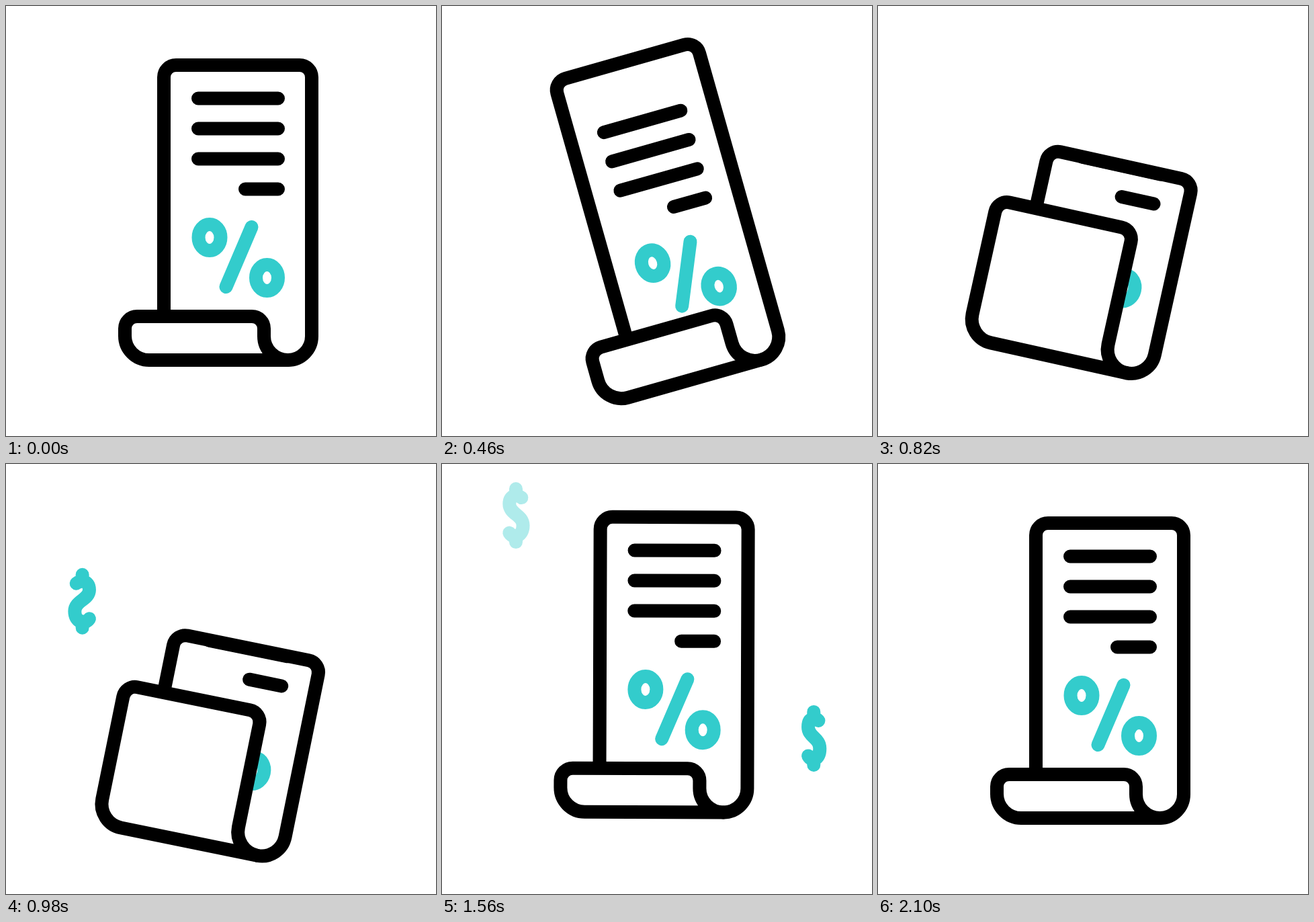
An HTML page with a canvas that plays this animation: 640 by 640 pixels, repeating every 2400 ms.

```html
<!DOCTYPE html>
<html lang="en">
<head>
<meta charset="utf-8">
<title>Receipt</title>
<style>
  html, body { margin: 0; height: 100%; overflow: hidden; background: #fff; }
  canvas { display: block; width: 640px; height: 640px; }
</style>
</head>
<body>
<canvas id="stage" width="640" height="640"></canvas>
<script>
const ctx = document.getElementById('stage').getContext('2d');
const LOOP = 2400, TEAL = '#33cccc', RAD = Math.PI / 180;

const dollar = new Path2D(
  'M0-39.5V-30M0 39.5V30M9.5-26.5C4-31-11-32-11-17S12-1 12 15C12 31-4 36-11 26');

const percent = new Path2D('M365.5 329 327.5 418');
for (const side of [-1, 1]) {
  const x = 345.75 + side * 42.75, y = 374.5 + side * 30;
  percent.moveTo(x + 16.5, y);
  percent.ellipse(x, y, 16.5, 19.5, 0, 0, 7);
}

const lines = new Path2D();
for (let i = 0; i < 4; i++) {
  lines.moveTo(i < 3 ? 286 : 356, 137.5 + 45 * i);
  lines.lineTo(405, 137.5 + 45 * i);
}

// Smooth step from 0 to 1 between two times.
function ramp(t, from, to) {
  const u = Math.min(Math.max((t - from) / (to - from), 0), 1);
  return u * u * (3 - 2 * u);
}

// Smooth rise to 1 and back to 0.
const bump = (t, from, peak, to) => ramp(t, from, peak) - ramp(t, peak, to);

// The paper stretches, rolls up and unrolls while it hops and rocks.
function pose(t) {
  const unroll = ramp(t, 1055, 1335);
  return {
    angle: -18 * bump(t, 0, 380, 887) + 14 * bump(t, 380, 887, 1360)
      - 10.3 * bump(t, 887, 1360, 1664) + 4 * bump(t, 1360, 1664, 2100),
    drop: 54 * bump(t, 0, 380, 640) - 24 * bump(t, 380, 640, 1105)
      + 53 * bump(t, 640, 1105, 1390) - 24 * bump(t, 1105, 1390, 1800)
      + 16 * bump(t, 1390, 1800, 2100),
    top: 88 - 72 * bump(t, 0, 395, 680) + 139 * (ramp(t, 395, 680) - unroll),
    fold: 462 - 145 * (ramp(t, 410, 640) - unroll)
  };
}

function stroke(path, color) {
  ctx.strokeStyle = color;
  ctx.stroke(path);
}

function outline(d) {
  const path = new Path2D(d);
  ctx.fill(path);
  stroke(path, '#000');
}

// A rising sign that spins about its upright axis; the pen keeps its width.
function drawDollar(x, y, age) {
  const alpha = Math.min(age, 768 - age, 100) / 100;
  if (alpha <= 0) return;
  const turn = -1.38 * Math.cos(age * 0.316 * RAD);
  const path = new Path2D();
  path.addPath(dollar, new DOMMatrix([turn, 0, 0, 1, x - 2 * turn, y - 0.22 * age]));
  ctx.globalAlpha = alpha;
  stroke(path, TEAL);
  ctx.globalAlpha = 1;
}

function drawReceipt(t) {
  const { angle, drop, top, fold } = pose(t);
  ctx.save();
  ctx.translate(316, 307.5 + drop);
  ctx.rotate(angle * RAD);
  ctx.translate(-316, -307.5);

  outline(`M235 ${fold}V${top + 18}a18 18 0 0 1 18-18H437a18 18 0 0 1 18 18
    V491.5A35.5 35.5 0 0 1 419.5 527`);

  ctx.save();
  ctx.beginPath();
  ctx.rect(225, top, 240, 537 - top);
  ctx.clip();
  stroke(lines, '#000');
  stroke(percent, TEAL);
  ctx.restore();

  outline(`M419.5 527H213A36 36 0 0 1 177 491V${fold + 18}a18 18 0 0 1 18-18
    H366a18 18 0 0 1 18 18V491.5A35.5 35.5 0 0 0 419.5 527Z`);
  ctx.restore();
}

function frame() {
  const t = performance.now() % LOOP;
  ctx.fillStyle = '#fff';
  ctx.fillRect(0, 0, 640, 640);
  ctx.lineWidth = 20;
  ctx.lineCap = ctx.lineJoin = 'round';
  drawDollar(111.75, 237, t - 832);
  drawDollar(554.8, 494, t - 1172);
  drawReceipt(t);
  requestAnimationFrame(frame);
}
frame();
</script>
</body>
</html>
```
